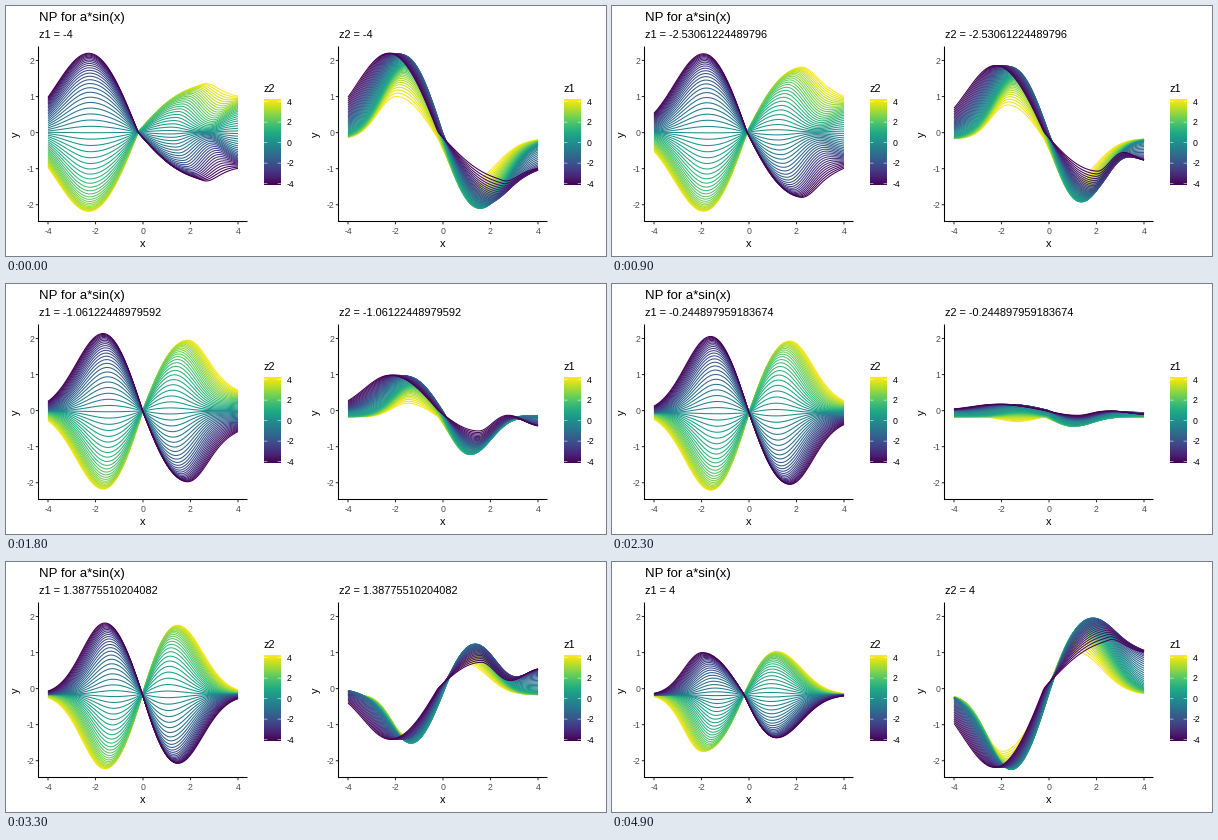
Recreate the animation shown at these times as a matplotlib script. Size 600x250 px, loop 5000 ms.

```python
import numpy as np
import matplotlib.pyplot as plt
from matplotlib.animation import FuncAnimation
from matplotlib.collections import LineCollection

W, H, DPI = 600, 250, 100
N = 50
PX = 72 / DPI  # points per pixel
LINE = 1.07 * PX
plt.rcParams["font.family"] = "Liberation Sans"

x = np.linspace(-4, 4, 120)
z = -4 + np.arange(N) * (8 / (N - 1))


def saturate(t, k):
    return np.tanh(k * t) / np.tanh(k)


def lobe(u, peak, width):
    """Sine rise from u = 0 to 1 at the peak, then a Gaussian fall."""
    rise = np.sin(np.pi / 2 * np.clip(u / peak, 0, 1))
    return rise * np.exp(-(np.maximum(u - peak, 0) / width) ** 2)


def decode():
    """Values of the decoded curves, indexed by [z1, z2, x]."""
    z1, t = z[:, None, None], z[None, :, None] / 4
    near_low = np.exp(-(z1 + 4) / 1.6)
    near_high = np.exp((z1 - 4) / 1.7)
    slack = 1 - np.abs(t)
    spread = 1 - .25 * slack
    crossing = -.013 * z1 ** 2

    left_peak = (1.6 - .04 * z1 + .02 * z1 ** 2) * (1 - (.2 + .04 * z1) * slack)
    left = lobe(crossing - x, left_peak, (1.5 - .1 * z1) * spread)
    left_size = (2.2 - .83 * near_high) * saturate(t, 1.9)
    left_sag = .1 * (1 - t ** 2) + .2 * near_high

    right_peak = (1.68 - .17 * z1 + .01 * z1 ** 2 - crossing) * (1 - (.35 - .04 * z1) * slack)
    right = lobe(x - crossing, right_peak, (1.5 - .5 * near_low) * spread)
    right_size = (2.15 - .9 * near_low - .95 * near_high) * saturate(t, 2.15 + .1 * z1)

    tail = 1 / (1 + np.exp((z1 + 1.3) / .7)) / (1 + np.exp((3.3 - x) / .35))
    base = -.08 - .09 * np.tanh(z1)
    return base - (left_size + left_sag) * left + right_size * right + saturate(t, 2) * tail


Y = decode()
ORDER = np.arange(N)[::-1]
COLORS = plt.cm.viridis((z[ORDER] + 4) / 8)

fig = plt.figure(figsize=(W / DPI, H / DPI), dpi=DPI, facecolor="white")
ax = fig.add_axes([0, 0, 1, 1])


def px(value):
    return 137 + 23.75 * value


def py(value):
    return 126.6 - 36.05 * value


def label(xpos, ypos, text, size=11, **style):
    return ax.text(xpos, ypos, text, fontsize=size * PX, **style)


def stroke(xs, ys, color="black", width=LINE):
    ax.plot(xs, ys, color=color, lw=width, solid_capstyle="butt", snap=False)


def draw_panel(left, legend):
    for v in (-4, -2, 0, 2, 4):
        stroke([left + px(v)] * 2, [215.5, 218.3], "#333333")
        label(left + px(v), 228, str(v), 8.8, color="#4D4D4D", ha="center")
    for v in (-2, -1, 0, 1, 2):
        stroke([left + 29.8, left + 32.5], [py(v)] * 2, "#333333")
        label(left + 28, py(v) + 3.2, str(v), 8.8, color="#4D4D4D", ha="right")
    stroke([left + 32.5] * 2, [40.5, 216])
    stroke([left + 32, left + 241.5], [215.5] * 2)
    label(left + 137, 241, "x", ha="center")
    label(left + 9.5, 128.5, "y", rotation=90, ha="center", va="center")

    label(left + 258, 86.5, legend)
    ax.imshow(np.linspace(1, 0, 256)[:, None], cmap="viridis", aspect="auto",
              extent=(left + 258, left + 275, 179, 93))
    for v in (-4, -2, 0, 2, 4):
        y = 136.6 - 10.25 * v
        for start in (258, 271.6):
            stroke([left + start, left + start + 3.4], [y, y], "white", LINE / 2)
        label(left + 280.8, y + 3.2, str(v), 8.8)

    curves = LineCollection([], colors=COLORS, linewidths=LINE, zorder=3)
    ax.add_collection(curves, autolim=False)
    return curves, label(left + 33, 32, "")


label(33, 15, "NP for a*sin(x)", 13.2)
left_curves, left_title = draw_panel(0, "z2")
right_curves, right_title = draw_panel(300, "z1")
ax.set(xlim=(0, W), ylim=(H, 0))
ax.axis("off")


def segments(left, values):
    return [np.column_stack([left + px(x), py(values[k])]) for k in ORDER]


def update(i):
    left_curves.set_segments(segments(0, Y[i]))
    right_curves.set_segments(segments(300, Y[:, i]))
    left_title.set_text(f"z1 = {z[i]:.15g}")
    right_title.set_text(f"z2 = {z[i]:.15g}")
    return left_curves, right_curves, left_title, right_title


anim = FuncAnimation(fig, update, frames=N, interval=100, repeat=True)
plt.show()
```
